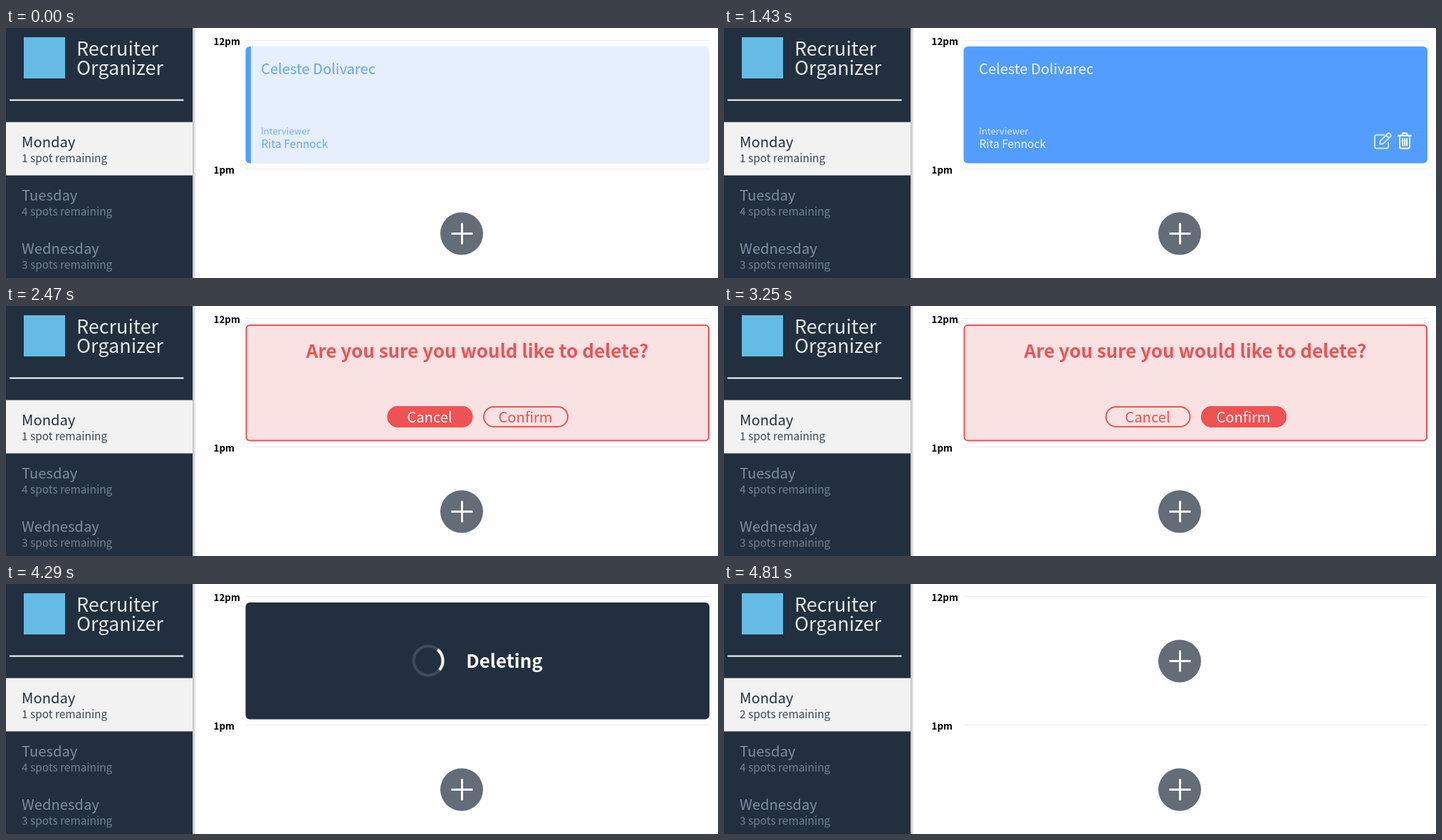
Animation, 1000 px wide and 352 px high, one loop 6.11 s. Source, as an HTML page:

```html
<!DOCTYPE html>
<html lang="en">
<head>
<meta charset="utf-8">
<title>Booking an appointment</title>
<style>
  html, body { margin: 0; width: 100%; height: 100%; overflow: hidden; background: #fefefe; }
  svg { display: block; width: 100vw; height: 100vh; }
  text {
    font-family: "Noto Sans CJK JP", "Noto Sans CJK SC", "Noto Sans CJK", "Noto Sans", sans-serif;
    font-size: 20.2px;
  }
  .title { font-size: 27px; font-weight: 300; fill: #e4e7ea; }
  .small { font-size: 15.4px; font-weight: 300; opacity: .88; }
  .label { font-size: 13px; font-weight: 300; opacity: .85; }
  .name { font-size: 15.5px; }
  .hour { font-size: 13.4px; font-weight: 700; }
  .big { font-size: 26px; font-weight: 600; text-anchor: middle; }
  .day { fill: #7b8fa3; }
  .chosen { fill: #222f3e; }
  .rule { stroke: #ececec; }
  .icon { fill: none; stroke: #fff; stroke-width: 2; stroke-linejoin: round; stroke-linecap: round; opacity: .72; }
  .button rect { fill: none; stroke: #ef5253; stroke-width: 2; }
  .button text { fill: #ef5253; text-anchor: middle; }
  .filled rect { fill: #ef5253; }
  .filled text { fill: #fff; }

  /* The loop is 47 ticks of 130 ms; every state change falls on a tick. */
  .timed { visibility: hidden; animation: 6110ms step-end infinite; }
  .idle { animation-name: idle; }
  .hover { animation-name: hover; }
  .ask { animation-name: ask; }
  .cancel { animation-name: cancel; }
  .confirm { animation-name: confirm; }
  .deleting { animation-name: deleting; }
  .loading { animation-name: loading; }
  .booked { animation-name: booked; }
  .free { animation-name: free; }
  .trash { animation: brighten 6110ms step-end infinite; }
  .status { animation: shift 6110ms step-end infinite; }
  .arc { transform-origin: 593px 108px; animation: spin 6110ms infinite; }

  @keyframes idle { 0% { visibility: visible } 6.382% { visibility: hidden } }
  @keyframes hover { 6.382% { visibility: visible } 31.914% { visibility: hidden } }
  @keyframes ask { 31.914% { visibility: visible } 61.702% { visibility: hidden } }
  @keyframes cancel { 40.425% { visibility: visible } 53.191% { visibility: hidden } }
  @keyframes confirm { 53.191% { visibility: visible } 61.702% { visibility: hidden } }
  @keyframes deleting { 61.702% { visibility: visible } 78.723% { visibility: hidden } }
  @keyframes loading { 65.957% { visibility: visible } 78.723% { visibility: hidden } }
  @keyframes booked { 0% { visibility: visible } 78.723% { visibility: hidden } }
  @keyframes free { 78.723%, 100% { visibility: visible } }
  @keyframes brighten {
    19.148% { opacity: .8 }
    21.276% { opacity: .9 }
    23.404%, 100% { opacity: 1 }
  }
  @keyframes shift { 65.957%, 100% { transform: translateX(22.5px) } }
  @keyframes spin {
    0%, 65.957% { transform: rotate(-234deg); animation-timing-function: steps(6, end) }
    78.723%, 100% { transform: rotate(46.8deg) }
  }
</style>
</head>
<body>
<svg viewBox="0 0 1000 352" preserveAspectRatio="none">
  <defs>
    <linearGradient id="shade">
      <stop stop-color="#000" stop-opacity=".26"/>
      <stop offset="1" stop-color="#000" stop-opacity="0"/>
    </linearGradient>
    <rect id="card" x="336.5" y="26" width="651.5" height="164.5" rx="6"/>
    <g id="add">
      <circle r="30" fill="#646c78"/>
      <path d="M-14.5 0h30M.5-15v30" stroke="#fff" stroke-width="3"/>
    </g>
  </defs>
  <rect width="1000" height="352" fill="#fefefe"/>

  <!-- Sidebar -->
  <rect x="262" width="5" height="352" fill="url(#shade)"/>
  <rect width="262" height="352" fill="#222f3e"/>
  <rect x="25" y="13" width="58" height="58" fill="#64bce6"/>
  <text class="title" x="99" y="39">Recruiter</text>
  <text class="title" x="99" y="66">Organizer</text>
  <path d="M5 101.5H249.500" stroke="#fff" stroke-width="2"/>
  <rect y="132.500" width="262" height="75" fill="#f2f2f2"/>
  <g class="chosen">
    <text x="22" y="168">Monday</text>
    <g class="timed booked"><text class="small" x="22" y="189">1 spot remaining</text></g>
    <g class="timed free"><text class="small" x="22" y="189">2 spots remaining</text></g>
  </g>
  <g class="day">
    <text x="22" y="243">Tuesday</text>
    <text class="small" x="22" y="263.500">4 spots remaining</text>
    <text x="22" y="318">Wednesday</text>
    <text class="small" x="22" y="338.500">3 spots remaining</text>
  </g>

  <!-- Schedule -->
  <text class="hour" x="291.500" y="23.500">12pm</text>
  <text class="hour" x="291.500" y="204.500">1pm</text>
  <path class="rule" d="M337 17.500H988M337 198.500H988"/>
  <use href="#add" x="640" y="289.500"/>
  <use class="timed free" href="#add" x="640" y="108.500"/>

  <g class="timed idle">
    <use href="#card" fill="#e5effe"/>
    <path d="M344 26h-1.500a6 6 0 0 0-6 6v152.500a6 6 0 0 0 6 6h1.500z" fill="#539eff"/>
    <g fill="#64a5fd">
      <text x="358" y="65">Celeste Dolivarec</text>
      <text class="label" x="358" y="150">Interviewer</text>
      <text class="name" x="358.500" y="169">Rita Fennock</text>
    </g>
  </g>

  <g class="timed hover">
    <use href="#card" fill="#539dff"/>
    <g fill="#eef4ff">
      <text x="358" y="65">Celeste Dolivarec</text>
      <text class="label" x="358" y="150">Interviewer</text>
      <text class="name" x="358.500" y="169">Rita Fennock</text>
    </g>
    <path class="icon" d="M927 150.500H916.500a2.500 2.500 0 0 0-2.500 2.500V167a2.500 2.500 0 0 0 2.500 2.500H930.500a2.500 2.500 0 0 0 2.500-2.500V161M921 163.500l.7-4.500L932 148.700q1.400-1.200 2.800 0l1.200 1.200q1.300 1.500 0 2.900L925.600 163zM929.700 151l4 4"/>
    <path class="icon trash" d="M947 151.500H965M952 151l1.500-3h5l1.500 3M949 152V167q0 2.500 2.500 2.500h9q2.500 0 2.500-2.500V152M953 156v9.500M956 156v9.500M959 156v9.500"/>
  </g>

  <g class="timed ask">
    <rect x="337.500" y="27" width="649.500" height="162.500" rx="5" fill="#fae2e3" stroke="#ef5253" stroke-width="2"/>
    <text class="big" x="662" y="72.500" fill="#ef5253">Are you sure you would like to delete?</text>
    <g class="button">
      <rect x="536.500" y="142" width="118" height="28" rx="14"/>
      <text x="595" y="163.500">Cancel</text>
      <rect x="671" y="142" width="118" height="28" rx="14"/>
      <text x="729.500" y="163.500">Confirm</text>
    </g>
  </g>
  <g class="button filled timed cancel">
    <rect x="536.500" y="142" width="118" height="28" rx="14"/>
    <text x="595" y="163.500">Cancel</text>
  </g>
  <g class="button filled timed confirm">
    <rect x="671" y="142" width="118" height="28" rx="14"/>
    <text x="729.500" y="163.500">Confirm</text>
  </g>

  <g class="timed deleting">
    <use href="#card" fill="#222f3e"/>
    <text class="big status" x="677.500" y="118" fill="#fff">Deleting</text>
  </g>
  <g class="timed loading" fill="none" stroke-width="4">
    <circle cx="593" cy="108" r="20.500" stroke="#414c59"/>
    <path class="arc" d="M593 128.500A20.500 20.500 0 0 1 572.500 108" stroke="#fff"/>
  </g>
</svg>
</body>
</html>
```
